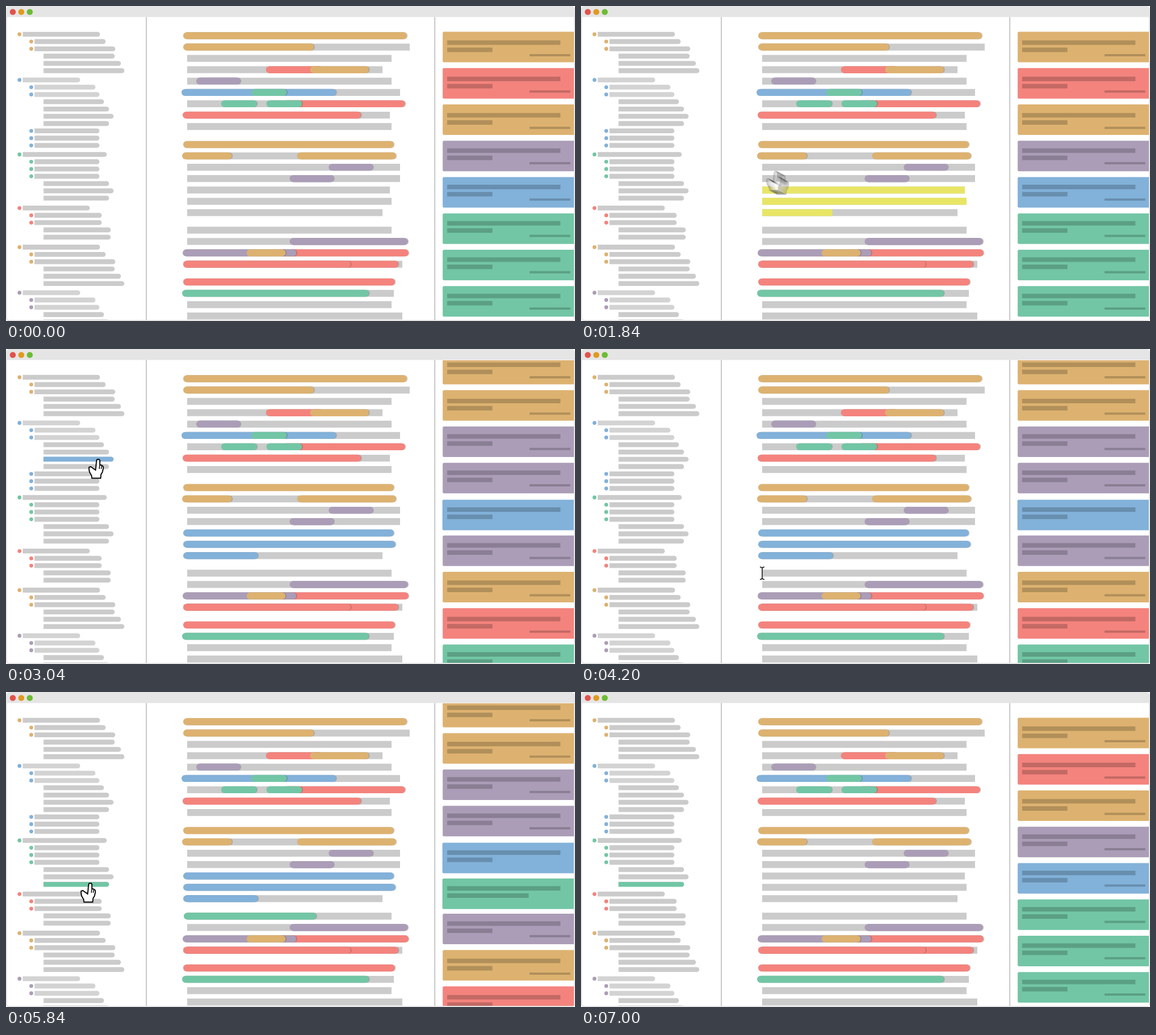
Recreate the animation shown at these times as an HTML page with a canvas. Size 1005 px wide and 557 px high, loop 7.04 s.

```html
<!DOCTYPE html>
<html lang="en">
<head>
<meta charset="utf-8">
<title>Highlights and notes</title>
<style>
  html, body { margin: 0; width: 100%; height: 100%; overflow: hidden; background: #fff; }
  canvas { display: block; }
</style>
</head>
<body>
<canvas id="stage" width="1005" height="557"></canvas>
<script>
const W = 1005, H = 557, LOOP = 7040, STEP = 40;
const stage = document.getElementById('stage').getContext('2d');
const layer = document.createElement('canvas');
layer.width = W;
layer.height = H;
const panel = layer.getContext('2d');

const color = { Y: '#ddb270', R: '#f4837d', P: '#ab9db7', B: '#82b1d9', G: '#72c6a5' };
const GREY = '#cbcbcb', LIGHT = '#d3d3d3', SELECT = '#e8e566', FRAME = '#e5e5e5';

const ramp = (t, a, b) => Math.min(1, Math.max(0, (t - a) / (b - a)));
const ease = (t, a, b) => (1 - Math.cos(Math.PI * ramp(t, a, b))) / 2;
const bump = (t, a, b) => Math.sin(Math.PI * ramp(t, a, b));
const mix = (a, b, k) => a + (b - a) * k;

function box(c, fill, x, y, w, h, r = 0) {
  c.fillStyle = fill;
  c.beginPath();
  c.roundRect(x, y, w, h, r);
  c.fill();
}

const dot = (fill, x, y, r) => box(stage, fill, x - r, y - r, 2 * r, 2 * r, r);

function withAlpha(c, alpha, draw) {
  if (alpha <= 0) return;
  c.save();
  c.globalAlpha *= alpha;
  draw();
  c.restore();
}

function drawFrame() {
  box(stage, '#fff', 0, 0, W, H);
  box(stage, FRAME, 0, 0, W, H, 6);
  box(stage, '#fff', 2, 19.5, 1001, 535.5, [0, 0, 4, 4]);
  ['#e2524b', '#e09a20', '#6cbc35'].forEach((fill, i) => dot(fill, 12 + 15 * i, 10.5, 5.3));
  for (const x of [246.8, 756.2]) box(stage, GREY, x, 19.5, 2.2, 535.5);
}

// Outline: colour, top, level of each row, right ends
const short = [166, 176, 193, 192, 203, 209];
const long = [131, 158, 165, 173, 182, 190, 182, 165, 165, 165];
const groups = [
  ['Y', 50, '011222', short],
  ['B', 130.7, '0112222111', long],
  ['G', 262.5, '0111222', [178, 165, 165, 165, 182, 190, 182]],
  ['R', 357.3, '01122', [148, 169, 169, 185, 185]],
  ['Y', 426.4, '011222', short],
  ['P', 507, '01122', long]
];
const levelX = [29.5, 50.3, 66.3];

function treeRow(fill, level, y, right) {
  const x = levelX[level];
  box(stage, fill, x, y - 4.3, right - x, 8.6, [0, 4.3, 4.3, 0]);
}

function drawTree() {
  for (const [c, top, levels, ends] of groups) {
    [...levels].forEach((level, i) => {
      const y = top + i * 12.87, pale = 'BP'.includes(c) && i < 3;
      treeRow(pale ? LIGHT : GREY, level, y, ends[i]);
      if (level < 2) dot(color[c], levelX[level] - 5.7, y, 3.4);
    });
  }
}

function activeRow(c, y, right, alpha, scale) {
  withAlpha(stage, alpha, () => {
    const mid = (levelX[2] + right) / 2;
    stage.translate(mid, y);
    stage.scale(scale, scale);
    stage.translate(-mid, -y);
    treeRow(color[c], 2, y, right);
  });
}

// Paragraphs: top, right end of each line
const LEFT = 320;
const lines = [
  [52.5, [701, 713, 681, 665, 681, 696, 698, 678, 681]],
  [245, [678, 682, 696, 696, 678, 681, 665]],
  [396.4, [681, 703, 704, 700]],
  [488, [680, 685, 681, 700]]
].flatMap(([top, ends]) => ends.map((end, i) => ({ y: top + i * 20.07, end })));

// Highlights: line and span; without a span the whole line
const marks = {
  R: [[3, 459, 560], [6, 490], [7, 312, 627], [18, 480], [19, 313, 693], [19, 313, 609], [20]],
  P: [[4, 336, 414], [11, 570, 648], [12, 501, 579], [17, 501], [18, 312, 513]],
  B: [[5, 310, 583]],
  Y: [[0], [1, 313, 544], [3, 537, 641], [9], [10, 311, 399], [10, 514], [18, 425, 494]],
  G: [[5, 433, 496], [6, 380, 443], [6, 460, 523], [21, 311, 641]]
};

function mark(c, [row, from = LEFT - 7, to = lines[row].end + 7]) {
  const y = lines[row].y - 6.2;
  box(stage, 'rgba(0,0,0,.2)', from + 2, y, to - from - 0.6, 12.4, 6.2);
  box(stage, color[c], from, y, to - from, 12.4, 6.2);
}

// Text selections: line, right end, start, end
const selections = [[13, 678, 280, 900], [14, 681, 900, 1526], [15, 444, 1526, 1735], [16, 548, 4200, 4870]];

function drawText(t) {
  const bar = (fill, y, w) => box(stage, fill, LEFT, y - 6.1, w, 12.2);
  for (const { y, end } of lines) bar(GREY, y, end - LEFT);
  for (const [row, right, a, b] of selections) {
    const click = row < 16 ? 2280 : 5280;
    withAlpha(stage, 1 - ramp(t, click, click + 120),
      () => bar(SELECT, lines[row].y, (right - LEFT) * ramp(t, a, b)));
  }
  for (const c in marks) marks[c].forEach(m => mark(c, m));
  const stay = 1 - ramp(t, 6560, 6920);
  withAlpha(stage, ramp(t, 2280, 2400) * stay, () => [[13], [14], [15, 313, 445]].forEach(m => mark('B', m)));
  withAlpha(stage, ramp(t, 5280, 5400) * stay, () => mark('G', [16, 314, 548]));
}

const cards = [...'YRYPBGGGPYRPYYPPBPYRG'];
const NEW_BLUE = 16, PITCH = 64.25, SCROLL = 808;

function card(c, y, noteWidth, dated) {
  const ink = 'rgba(0,0,0,.2)', top = y + ('YR'.includes(c) ? 15.3 : 13.5);
  box(panel, color[c], dated ? 771.3 : 770.8, y, 232, 54, [2.5, 0, 0, 2.5]);
  box(panel, ink, 779.2, top, 200, 8);
  box(panel, ink, 779.2, top + 12.8, noteWidth, 8);
  if (dated) box(panel, ink, 924.7, top + 24.3, 72, 4);
}

const scrollAt = t => SCROLL * (ease(t, 2280, 2960) - ease(t, 6560, 6930));

function paintCards(t, scroll) {
  box(panel, '#fff', 770, 19.5, 233, 535.5);
  cards.forEach((c, i) => {
    const start = 5480 + (i - NEW_BLUE - 1) * 40, fresh = i === NEW_BLUE;
    const shift = i > NEW_BLUE ? 62.3 * ease(t, start, start + 220) : 0;
    withAlpha(panel, fresh ? ramp(t, 2880, 3040) : 1,
      () => card(c, 45.5 + i * PITCH - scroll + shift + fresh, 80, !fresh));
  });
  withAlpha(panel, ramp(t, 5600, 5840),
    () => card('G', 45.5 + (NEW_BLUE + 1) * PITCH - scroll, 144, false));
}

// Fast scrolling is averaged over a shutter interval
function drawCards(t) {
  const shutter = 115;
  const moving = Math.abs(scrollAt(t + shutter / 2) - scrollAt(t - shutter / 2)) > 1;
  const n = moving ? 36 : 1;
  for (let i = 0; i < n; i++) {
    paintCards(t, scrollAt(moving ? t + shutter * ((i + 0.5) / n - 0.5) : t));
    stage.globalAlpha = 1 / (i + 1);
    stage.drawImage(layer, 770, 19.5, 233, 535.5, 770, 19.5, 233, 535.5);
  }
  stage.globalAlpha = 1;
}

function beam(x, y) {
  const serif = s => `M${x - 4} ${y + 11 * s}Q${x} ${y + 11 * s} ${x} ${y + 8 * s}Q${x} ${y + 11 * s} ${x + 4} ${y + 11 * s}`;
  stage.strokeStyle = '#111';
  stage.lineWidth = 1.5;
  stage.stroke(new Path2D(`M${x} ${y - 9}V${y + 9}${serif(-1)}${serif(1)}`));
}

const handShape = new Path2D(`M14.3 3L15.5 1.2H18.8L20 3V11L23 11.5L25.8 13.5L26.2 17L24.5 24
  L22 28L21.5 34.5H6L5.5 30L2 24L.9 19L1 15L4 14L8 17L12.5 20Z`);
const handLines = new Path2D('M20 11L19 18M23.3 12.5L22.5 18');

function hand([x, y]) {
  stage.save();
  stage.translate(x - 13.3, y - 18);
  stage.fillStyle = '#fff';
  stage.strokeStyle = '#000';
  stage.lineWidth = 1.9;
  stage.fill(handShape);
  stage.stroke(handShape);
  stage.lineWidth = 1.5;
  stage.stroke(handLines);
  stage.restore();
}

// Hand trips: start, end, from, to
const blueRow = [159, 212], greenRow = [145, 355];
const trips = [
  [1735, 2000, [444, 365], blueRow],
  [3290, 3600, blueRow, [LEFT, 396]],
  [4870, 5140, [548, 396], greenRow]
];

function drawPointer(t) {
  for (const [row, right, a, b] of selections) {
    const from = row === 16 ? 3600 : a;
    if (t >= from && t < b) return beam(mix(LEFT, right, ramp(t, a, b)), lines[row].y);
  }
  const trip = trips.findLast(([a]) => t >= a);
  if (!trip) return;
  const [a, b, p, q] = trip;
  const at = s => p.map((v, i) => mix(v, q[i], ease(s, a, b)));
  if (t < b) {
    for (let i = 0; i < 8; i++) withAlpha(stage, 0.2, () => hand(at(t + i * 1.2 - 4.2)));
  } else {
    withAlpha(stage, 1 - ramp(t, 6560, 6760), () => hand(q));
  }
}

function draw(t) {
  drawFrame();
  drawTree();
  activeRow('B', 194.8, 190, ramp(t, 2000, 2120) * (1 - ramp(t, 3290, 3440)), 1 + 0.1 * bump(t, 2280, 2480));
  activeRow('G', 340.3, 182, ramp(t, 5120, 5200), 1 + 0.2 * bump(t, 5280, 5680));
  drawText(t);
  drawCards(t);
  box(stage, FRAME, 2, 555, 1001, 2, [0, 0, 6, 6]);
  drawPointer(t);
}

const began = performance.now();
let shown = -1;
function tick() {
  const t = Math.floor((performance.now() - began) % LOOP / STEP) * STEP;
  if (t !== shown) draw(shown = t);
  requestAnimationFrame(tick);
}
tick();
</script>
</body>
</html>
```
